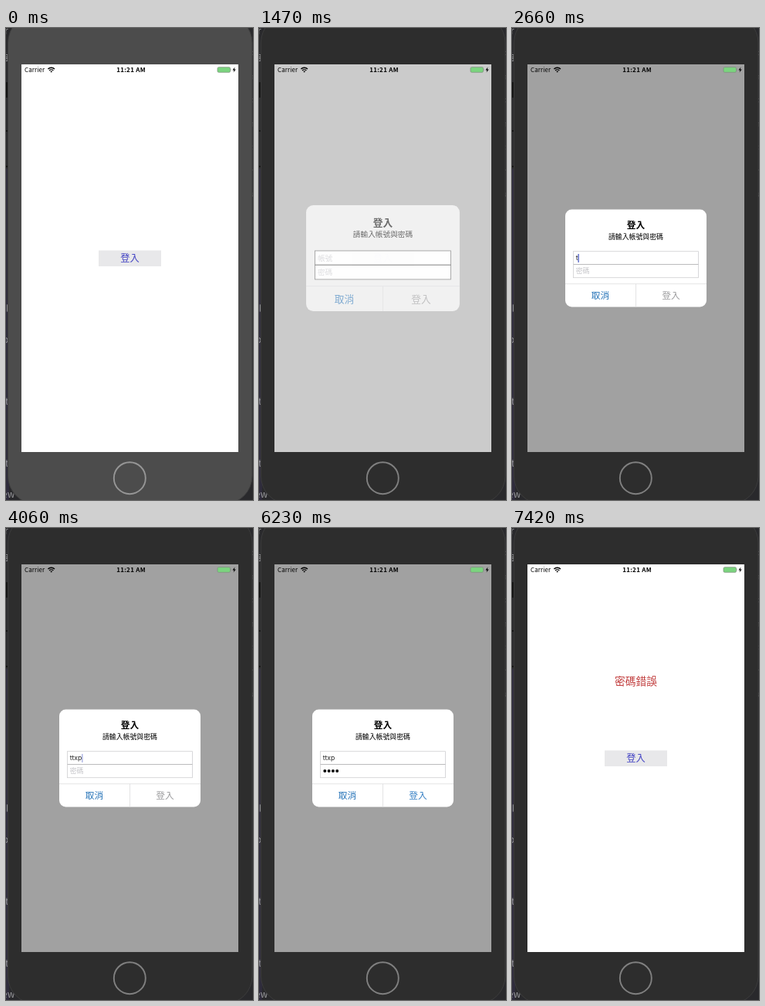
Recreate the animation shown at these times as an HTML page. Size 320 by 610 pixels, loop 8000 ms.

```html
<!DOCTYPE html>
<html lang="zh-Hant">
<head>
<meta charset="utf-8">
<title>登入</title>
<style>
  html, body { margin: 0; width: 100%; height: 100%; overflow: hidden; background: #29292c; }
  svg { display: block; width: 320px; height: 610px; }
  text { font-family: "Noto Sans CJK TC", "Noto Sans CJK", sans-serif; }
  .mid { text-anchor: middle; }
  .latin { font-family: Inter, Roboto, sans-serif; }
  .hint { fill: #c4c4c8; font-size: 8.9px; }
  .action { font-size: 11.7px; }
</style>
</head>
<body>
<svg viewBox="0 0 320 610">
  <rect width="320" height="610" fill="#29292c"/>
  <rect y="182" width="4" height="428" fill="#2f2c3c"/>
  <g id="behind" class="latin" font-size="12" fill="#99999c"></g>
  <g fill="#111"><rect y="70" width="3" height="20"/><rect y="132" width="3" height="2"/><rect y="178" width="3" height="2"/></g>
  <rect id="body" x="2.5" y="-17" width="316.5" height="632" rx="36" stroke="#3c3c3c"/>
  <circle id="home" cx="160.3" cy="581.7" r="20.5" fill="none" stroke-width="1.9"/>

  <rect x="20" y="47" width="281" height="501" fill="#fff"/>
  <text id="error" class="mid" x="160.5" y="202.6" font-size="13.7" fill="#c23f3f">密碼錯誤</text>
  <rect x="120" y="287.5" width="81" height="20.5" fill="#e8e8ea"/>
  <text class="mid" x="160.5" y="302.2" font-size="12.2" fill="#4343c4">登入</text>
  <rect id="shade" x="20" y="47" width="281" height="501"/>

  <g class="latin" font-size="8">
    <text x="24" y="57" letter-spacing=".1">Carrier</text>
    <text class="mid" x="162" y="57" font-weight="600" letter-spacing=".3">11:21 AM</text>
  </g>
  <g fill="none" stroke="#000" stroke-width="1.4">
    <path d="M54.4 53a6 6 0 0 1 8.6 0M56.1 54.9a3.7 3.7 0 0 1 5.2 0"/>
  </g>
  <path d="M57.4 56.2a1.9 1.9 0 0 1 2.6 0l-1.3 1.4z"/>
  <rect x="274" y="50.7" width="16.5" height="6.6" rx="1.5" fill="#7bd47f" stroke="#7d8f7d" stroke-width=".7"/>
  <path d="M291.4 52.8q1 1.2 0 2.4z" fill="#777"/>
  <path d="M296.5 50.6l-3 3.9h2l-.9 3 3.2-4h-2z"/>

  <g id="alert">
    <rect id="panel" x="69" y="234.5" width="183" height="126" rx="8.5" fill="#fff"/>
    <path id="press" d="M161 331H252V352a8.5 8.5 0 0 1-8.5 8.5H161z" fill="#e9e9e9"/>
    <g id="fields">
      <rect x="79.5" y="288.7" width="162" height="34" fill="#fff" stroke-width=".8"/>
      <path d="M79.5 305.5h162" stroke-width=".9"/>
    </g>
    <g id="copy">
      <path d="M69 330.7h183M160.5 330.7v29.8" stroke="#dcdcde" stroke-width=".8"/>
      <text class="mid" x="160.5" y="259.3" font-size="11.7" font-weight="bold">登入</text>
      <text class="mid" x="160.5" y="272.6" font-size="8.9">請輸入帳號與密碼</text>
      <text id="nameHint" class="hint" x="82.7" y="300.4">帳號</text>
      <text id="passHint" class="hint" x="82.7" y="317.3">密碼</text>
      <text id="name" class="latin" x="82.7" y="300.2" font-size="8.6" fill="#222"></text>
      <g id="dots" fill="#111"></g>
      <text id="last" class="latin" y="317" font-size="8.6" fill="#222">t</text>
      <text class="mid action" x="114.5" y="350.4" fill="#2573b8">取消</text>
      <text id="submit" class="mid action" x="206" y="350.4">登入</text>
      <rect id="caret" width="1.2" height="11" fill="#3d4fc0"/>
    </g>
  </g>
</svg>
<script>
const LOOP = 8000, STEP = 70;
const USER = "ttxp";
const NAME_KEYS = [2660, 3220, 3360, 3500];
const PASS_KEYS = [4970, 5250, 5320, 5390];
const DOT_GAP = 5.3, TEXT_X = 82.7;

const el = {};
document.querySelectorAll("[id]").forEach(n => el[n.id] = n);
const set = (node, attrs) => { for (const k in attrs) node.setAttribute(k, attrs[k]); };
const add = (parent, tag, attrs, text = "") => {
  const n = document.createElementNS("http://www.w3.org/2000/svg", tag);
  set(n, attrs);
  n.textContent = text;
  parent.append(n);
  return n;
};
const show = (node, on) => set(node, { visibility: on ? "inherit" : "hidden" });
const clamp = x => Math.max(0, Math.min(1, x));
const typed = (keys, t) => keys.filter(k => t >= k).length;
const grey = v => `rgb(${v},${v},${v})`;

// Clipped editor text around the phone
[["r", -2, 8], ["角", -8, 42], ["l", 0, 367], ["o", -4, 407], ["t", -1, 487], ["t", -1, 567], ["ew", -5, 607]]
  .forEach(([s, x, y]) => add(el.behind, "text", { x, y }, s));
[..."cedatns"].forEach((s, i) =>
  add(el.behind, "text", { x: 316.5, y: 35 + i * 30.5, "font-size": 9, opacity: .6 }, s));
const dots = PASS_KEYS.map((_, i) =>
  add(el.dots, "circle", { cx: 85.3 + i * DOT_GAP, cy: 313.9, r: 2 }));

// How far the alert is presented, 0 to 1
function presence(t) {
  if (t < 1470 || t >= 6510) return 0;
  if (t < 1610) return .55;
  if (t < 2310) return 1 - .45 * Math.exp(-(t - 1470) / 90);
  if (t < 6370) return 1;
  return t < 6440 ? .5 : .15;
}

function caretAlpha(t) {
  const fade = start => 1 - clamp((t - start + STEP) / 280);
  if (t < 1610) return 0;
  if (t < 2450) return fade(2100);
  if (t < 2660) return t < 2520 ? .5 : 1;
  if (t < 4410) return fade(3990);
  return fade(6020);
}

function drawAlert(t) {
  const v = presence(t);
  show(el.alert, v > 0);
  set(el.shade, { opacity: .37 * v });
  if (!v) return;

  const scale = t < 2310 ? 1 + .193 * (1 - v) : 1;
  set(el.alert, { transform: `translate(160.5 297.5) scale(${scale}) translate(-160.5 -297.5)` });
  set(el.panel, { opacity: Math.min(1 - .6 * (1 - v), 1.5 * v) });
  set(el.copy, { opacity: v });
  set(el.fields, { opacity: Math.min(1, 1.7 * v) });
  const [box, line] = el.fields.children;
  set(box, { stroke: v < .9 ? "#999" : "#cfcfd1" });
  set(line, { stroke: v < .9 ? "#777" : "#b4b4b6" });

  const names = typed(NAME_KEYS, t), chars = typed(PASS_KEYS, t);
  const masked = t >= 6020 ? chars : Math.max(0, chars - 1);
  el.name.textContent = USER.slice(0, names);
  show(el.nameHint, !names);
  show(el.passHint, !chars);
  dots.forEach((d, i) => show(d, i < masked));
  const lastX = TEXT_X + masked * DOT_GAP;
  set(el.last, { x: lastX });
  show(el.last, masked < chars);

  const inPass = t >= 4410;
  const end = inPass
    ? lastX + (masked < chars ? el.last.getComputedTextLength() : 0)
    : TEXT_X + (names ? el.name.getComputedTextLength() : 0);
  set(el.caret, { x: end, y: inPass ? 308.5 : 292, opacity: caretAlpha(t) });
  set(el.submit, { fill: chars ? "#357fc4" : "#9b9b9d" });
  show(el.press, t >= 6160 && t < 6230);
}

function draw(ms) {
  const t = Math.floor(ms / STEP + 1e-6) * STEP;
  const focused = t >= 980;
  set(el.body, { fill: grey(focused ? 45 : 76) });
  set(el.home, { stroke: grey(focused ? 128 : 150) });
  show(el.error, t >= 7420);
  drawAlert(t);
}

const start = performance.now();
function tick() {
  draw((performance.now() - start) % LOOP);
  requestAnimationFrame(tick);
}
tick();
</script>
</body>
</html>
```
